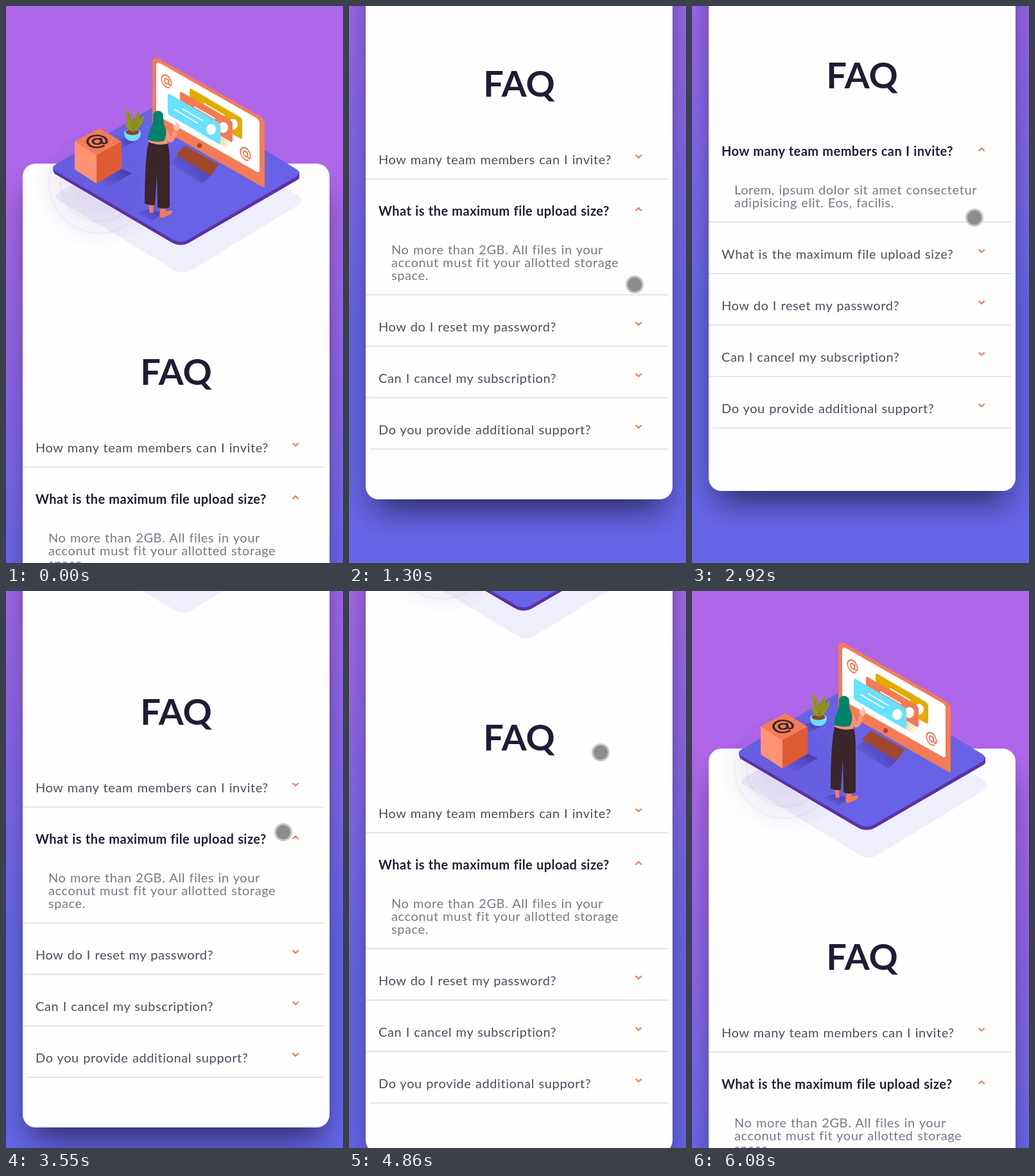
Animation of 525 by 866 pixels, one loop 6.71 s. Source, as an HTML page:

```html
<!DOCTYPE html>
<html lang="en">
<head>
<meta charset="utf-8">
<title>FAQ</title>
<style>
  html, body { margin: 0; width: 100%; height: 100%; overflow: hidden; }
  #stage { position: relative; width: 525px; height: 866px; overflow: hidden; }
  #page {
    position: absolute; inset: 0 0 auto; height: 1327px;
    background: linear-gradient(#af67e9 240px, #6565e7 920px);
    font: 20px/20px Lato, "Open Sans", sans-serif;
    letter-spacing: .6px; word-spacing: .7px;
  }
  #card {
    position: absolute; left: 26px; top: 245px; width: 478px; height: 970px;
    border-radius: 20px; background: #fefefe;
    box-shadow: 0 30px 50px -15px rgba(0, 0, 0, .6);
  }
  #art { position: absolute; left: 0; top: 0; }
  h1 {
    position: absolute; left: 26px; top: 540px; width: 478px; margin: 0;
    font-size: 56px; line-height: 56px; letter-spacing: 0;
    text-align: center; color: #1d1e35;
  }
  #list { position: absolute; left: 26px; top: 638px; width: 471px; }
  .row { position: relative; padding: 38px 0 22px 20px; color: #4b4c5f; }
  .row::after {
    content: ""; position: absolute; left: 0; right: 0; bottom: 0;
    height: 2px; background: #e5e5e7;
  }
  .row:last-child::after { left: 6px; }
  .row p { display: none; margin: 40px 0 0 20px; color: #787887; white-space: nowrap; }
  .row svg { position: absolute; left: 419px; top: 40px; }
  .open p { display: block; }
  .open b { font-weight: 700; color: #1d1e35; letter-spacing: .45px; word-spacing: .5px; }
  .open svg { top: 42px; transform: scaleY(-1); }
  b { font-weight: 400; }
  #dot {
    position: absolute; left: -14px; top: -14px; width: 28px; height: 28px;
    box-sizing: border-box; border-radius: 50%;
    background: #8d8d8d; border: 3px solid #c6c6c6;
  }
</style>
</head>
<body>
<div id="stage">
  <div id="page">
    <div id="card"></div>
    <svg id="art" width="525" height="430" viewBox="0 0 525 430">
      <defs>
        <g id="at" fill="none" stroke-width="2.2" stroke-linecap="round">
          <circle r="4"/>
          <path d="M4-4V1.5C4 5.5 9 5 9 0A9 9 0 1 0 5 7.5"/>
        </g>
        <g id="slip">
          <path d="M0 3Q0-1 3 1L79 45Q82 47 82 50V76Q82 80 79 78L3 34Q0 32 0 29Z"/>
          <path d="M23 24L54 42M11 25L46 46" stroke="#fff" stroke-width="2" stroke-linecap="round"/>
          <ellipse cx="67.500" cy="56" rx="7.500" ry="8.500" fill="#fff"/>
        </g>
        <radialGradient id="halo">
          <stop offset=".35" stop-color="#5a32a0" stop-opacity=".1"/>
          <stop offset="1" stop-color="#5a32a0" stop-opacity="0"/>
        </radialGradient>
        <linearGradient id="shade" x1="1" x2="0" y1="0" y2=".6">
          <stop stop-color="#3b2f96" stop-opacity=".8"/>
          <stop offset="1" stop-color="#3b2f96" stop-opacity="0"/>
        </linearGradient>
        <linearGradient id="sand">
          <stop stop-color="#efd9a4"/>
          <stop offset="1" stop-color="#fff"/>
        </linearGradient>
      </defs>

      <!-- platform -->
      <path d="M80 291L270 185L456 295Q463 303 456 309L290 410Q275 419 261 410L80 301Q74 296 80 291Z" fill="#efeefb"/>
      <path d="M73 251L457 258V266Q457 269 453 271L287 367Q272 376 257 367L76 261Q73 258 73 251Z" fill="#5a32a0"/>
      <path d="M76 247L252 144Q262 138 272 144L453 254Q460 260 453 265L286 362Q272 371 258 362L76 256Q70 251 76 247Z" fill="#6862e6"/>
      <circle cx="145" cy="275" r="105" fill="url(#halo)"/>
      <g fill="none" stroke="#5a32a0" stroke-opacity=".04" stroke-width="3">
        <circle cx="145" cy="275" r="60"/><circle cx="145" cy="275" r="78"/>
      </g>

      <!-- shadows -->
      <g fill="url(#shade)">
        <path d="M141 276L180 253L196 260L160 281Z"/>
        <path d="M186 205L200 211L178 222L164 211Z"/>
        <path d="M268 233L320 262L306 276L254 244Z"/>
        <path d="M222 316L245 322L228 334L202 321Z"/>
      </g>

      <!-- cube -->
      <path d="M107 210L146 190L180 211L141 232Z" fill="#f47b56"/>
      <path d="M107 210L141 232V276L107 254Z" fill="#ff9272"/>
      <path d="M141 232L180 211V253L141 276Z" fill="#df5c33"/>
      <use href="#at" transform="matrix(1.65 -.15 .25 1.03 142 210.500)" stroke="#3a2329"/>

      <!-- plant -->
      <path d="M184 197Q185 210 197 210Q210 209 210 197Z" fill="#68e1fd"/>
      <ellipse cx="197" cy="197" rx="13" ry="6" fill="#68e1fd"/>
      <ellipse cx="197" cy="196" rx="10.500" ry="4.500" fill="#8f4526"/>
      <path d="M196 194Q185 176 188 159Q200 172 198 190Q199 172 207 162Q210 178 201 191Q204 176 215 170Q214 186 200 195Q188 195 185 180Q193 182 196 194Z" fill="#949619"/>
      <path d="M190 166L198 193L206 167M198 193L212 174" fill="none" stroke="#747b10" stroke-width=".8"/>

      <!-- monitor -->
      <path d="M278 217L331 246L319 264L265 231Z" fill="#a0482b"/>
      <path d="M228 87Q228 78 237 81L395 171Q403 176 403 184V279Q403 284 399 281L231 185Q228 183 228 179Z" fill="#f47b56"/>
      <path d="M234 92Q234 86 240 89L390 174Q395 177 395 183V255Q395 260 391 258L237 171Q234 169 234 166Z" fill="#fff"/>
      <circle cx="301.500" cy="217" r="3.800" fill="#a3492b"/>
      <g stroke="#f47b56">
        <use href="#at" transform="matrix(.85 .4 0 1.02 250 117)"/>
        <use href="#at" transform="matrix(.85 .4 0 1.02 373 230)"/>
      </g>
      <path d="M334 202L353 212L344 221L332 214Z" fill="url(#sand)"/>
      <use href="#slip" x="286" y="128" fill="#e2ab00"/>
      <use href="#slip" x="271" y="133" fill="#f47b56"/>
      <use href="#slip" x="252" y="136" fill="#68e1fd"/>

      <!-- woman -->
      <path d="M244 188Q249 187 253 196L257 202L263 189L268 193Q263 211 257 212Q250 212 243 205Z" fill="#ff9272"/>
      <path d="M261 190L260 183L264 186L266 180L270 186L270 191L266 195Z" fill="#ffc0a5"/>
      <path d="M222 308H229L230 321L224 322ZM241 314H249L249 319L259 318Q260 323 252 326L242 330L239 325Z" fill="#f47b56"/>
      <path d="M223 209H251Q255 222 255 245V313Q246 317 236 313L235 262L232 309Q224 311 216 307Q216 255 220 222Z" fill="#3b2528"/>
      <path d="M222 205L251 206L252 214Q236 218 222 211Z" fill="#ff9272"/>
      <path d="M229 169Q231 162 238 163Q246 164 245 175Q245 183 249 191Q251 202 246 210Q233 213 221 208Q222 194 228 185Q230 177 229 169Z" fill="#00826a"/>
    </svg>
    <h1>FAQ</h1>
    <div id="list"></div>
  </div>
  <div id="dot"></div>
</div>
<script>
  const LOOP = 6710, STEP = 77.3, LEAD = 126;
  const items = [
    ["How many team members can I invite?",
     "Lorem, ipsum dolor sit amet consectetur<br>adipisicing elit. Eos, facilis."],
    ["What is the maximum file upload size?",
     "No more than 2GB. All files in your<br>acconut must fit your allotted storage<br>space."],
    ["How do I reset my password?", ""],
    ["Can I cancel my subscription?", ""],
    ["Do you provide additional support?", ""]
  ];
  // pointer path: step, x, y
  const path = [
    [0, 476, 751], [3, 445, 433], [18, 445, 433], [24, 462, 235], [27, 452, 229],
    [36, 440, 329], [40, 432, 375], [55, 432, 375], [58, 392, 251], [72, 392, 251],
    [73, 425, 436], [74, 425, 656], [76, 480, 798]
  ];
  const $ = id => document.getElementById(id);
  const clamp = v => Math.min(1, Math.max(0, v));
  const mix = (a, b, k) => a + (b - a) * k;

  $("list").innerHTML = items.map(([q, a]) => `<div class="row"><b>${q}</b>
    <svg width="12" height="8"><path d="M1.500 1.500L6 6L10.500 1.500" fill="none" stroke="#f47b56" stroke-width="2.200"/></svg>
    <p>${a}</p></div>`).join("");
  const rows = [...document.querySelectorAll(".row")];

  function scrollAt(n) {
    if (n < 44) return 461 * (1 - Math.cos(Math.PI * clamp((n - 6) / 10.1))) / 2;
    return 381 * (1 - clamp((n - 60.4) / 9.8)) ** 1.775;
  }

  function pointerAt(n) {
    const i = Math.max(1, path.findIndex(p => p[0] >= n));
    const [a, b] = [path[i - 1], path[i]];
    const k = (n - a[0]) / (b[0] - a[0]);
    return [mix(a[1], b[1], k), mix(a[2], b[2], k)];
  }

  function draw() {
    const n = Math.floor((performance.now() % LOOP - LEAD) / STEP);
    const open = n >= 28 && n < 44 ? 0 : 1;
    rows.forEach((row, i) => row.classList.toggle("open", i === open));
    $("page").style.transform = `translateY(${-Math.round(scrollAt(n))}px)`;

    const shown = n >= 0 && n < 77;
    $("dot").style.visibility = shown ? "visible" : "hidden";
    if (shown) {
      const [x, y] = pointerAt(Math.min(n, 76));
      $("dot").style.transform = `translate(${x}px, ${y}px)`;
    }
    requestAnimationFrame(draw);
  }
  draw();
</script>
</body>
</html>
```
